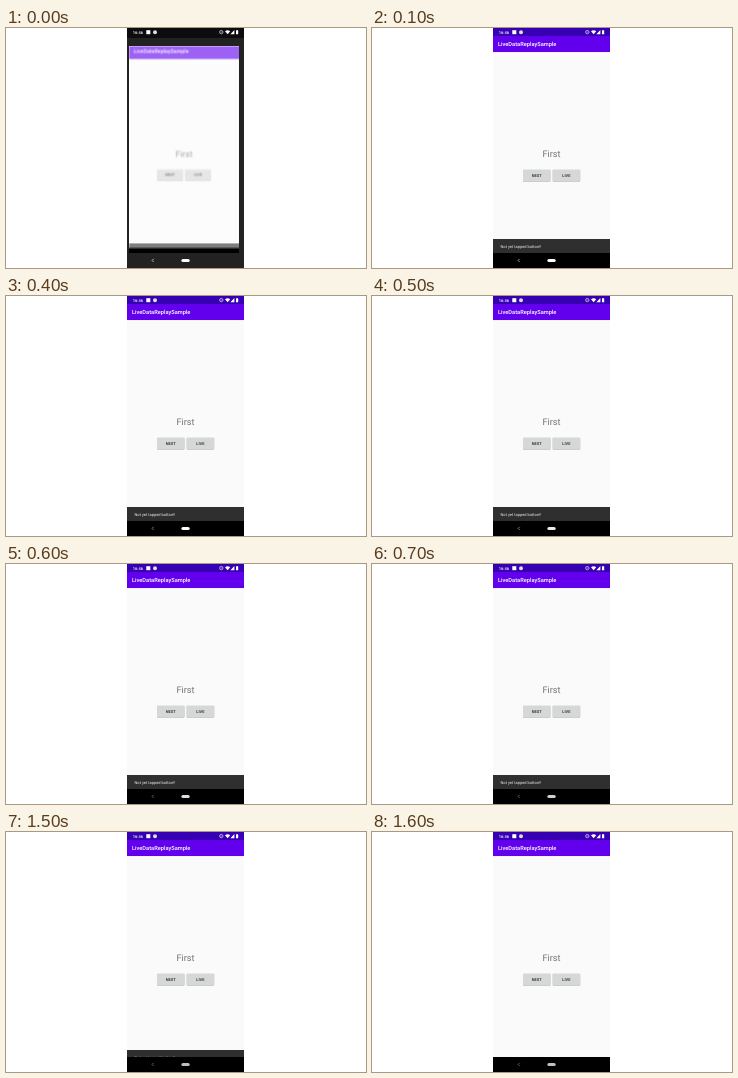
These frames come from a looping animation (360x240 px, 1700 ms). An HTML page:

```html
<!DOCTYPE html>
<html lang="en">
<head>
<meta charset="utf-8">
<title>LiveDataReplaySample</title>
<style>
  html, body { margin: 0; width: 100%; height: 100%; overflow: hidden; background: #fff; }
  svg { display: block; width: 100vw; height: 100vh; }
  text { font-family: Roboto, sans-serif; text-rendering: geometricPrecision; }
  .medium { font-weight: 500; }
  .label { font-size: 4px; }
  .middle { text-anchor: middle; }

  .window, .cut, .fade, .snackbar, .message, .pill, .back {
    animation: 1700ms step-end infinite;
  }
  .window { animation-name: open; }
  .cut { animation-name: cut; }
  .fade { animation-name: appear; }
  .snackbar { animation-name: slide; }
  .message { animation-name: message; }
  .pill { animation-name: pill; }
  .back { animation-name: back; }

  @keyframes open {
    0% { transform: translate(9.26px, 8.4px) scale(.94); }
    5.882%, 100% { transform: none; }
  }
  /* The opening window is cropped at its top and bottom. */
  @keyframes cut {
    0% { clip-path: inset(10px 0 9px 0); }
    5.882%, 100% { clip-path: inset(0); }
  }
  @keyframes appear {
    0% { opacity: .62; }
    5.882%, 100% { opacity: 1; }
  }
  @keyframes slide {
    0% { transform: translateY(8.8px); }
    5.882% { transform: none; }
    88.235% { transform: translateY(7px); }
    94.118%, 100% { transform: translateY(15px); }
  }
  @keyframes message {
    0% { opacity: 0; }
    5.882% { opacity: 1; }
    88.235% { opacity: .6; }
    94.118%, 100% { opacity: 0; }
  }
  @keyframes pill {
    0% { fill: #fff; }
    29.412% { fill: #ececec; }
    35.294% { fill: #dedede; }
    41.176% { fill: #d2d2d2; }
    47.059% { fill: #c8c8c8; }
    52.941%, 100% { fill: #c0c0c0; }
  }
  @keyframes back {
    0% { stroke: #ddd; }
    5.882% { stroke: #bbb; }
    23.529% { stroke: #999; }
    35.294%, 100% { stroke: #777; }
  }
</style>
</head>
<body>
<svg viewBox="0 0 360 240">
  <defs>
    <clipPath id="screen"><rect x="121" width="117" height="240"/></clipPath>
    <clipPath id="content"><rect x="121" y="24" width="117" height="201"/></clipPath>
  </defs>
  <rect width="360" height="240" fill="#fff"/>

  <g clip-path="url(#screen)">
    <rect x="121" width="117" height="240" fill="#222"/>
    <rect x="121" width="117" height="10" fill="#0c0c0e"/>

    <svg class="cut" width="360" height="240">
      <g class="window">
        <rect x="121" width="117" height="240" fill="#fff"/>
        <g class="fade">
          <rect x="121" y="8" width="117" height="16.2" fill="#6200ee"/>
          <text class="medium" x="126" y="18.1" font-size="5.7" fill="#fff">LiveDataReplaySample</text>
          <rect x="121" y="24.2" width="117" height="201" fill="#fafafa"/>
          <text class="middle" x="179.5" y="128.5" font-size="9.1" fill="#737373">First</text>

          <g fill="#bbb">
            <rect x="151" y="142" width="27.5" height="11.7" rx=".7"/>
            <rect x="180.7" y="142" width="27.5" height="11.7" rx=".7"/>
          </g>
          <g fill="#d6d7d7">
            <rect x="151" y="141.5" width="27.5" height="11.7" rx=".7"/>
            <rect x="180.7" y="141.5" width="27.5" height="11.7" rx=".7"/>
          </g>
          <g class="medium label middle" fill="#222">
            <text x="164.7" y="148.9">NEXT</text>
            <text x="194.4" y="148.9">LIVE</text>
          </g>

          <g clip-path="url(#content)">
            <g class="snackbar">
              <rect x="121" y="211" width="117" height="14.5" fill="#2f2f2f"/>
              <text class="label message" x="128.5" y="219.8" fill="#eee">Not yet tapped button!!</text>
            </g>
          </g>
        </g>
        <rect x="121" width="117" height="8" fill="#3700b3"/>
        <rect x="121" y="225" width="117" height="15" fill="#000"/>
      </g>
    </svg>

    <!-- System status and navigation -->
    <g fill="#fff">
      <text class="medium label" x="126.8" y="5.6">16:46</text>
      <rect x="140.3" y="2.2" width="4" height="4"/>
      <circle cx="149" cy="4.2" r="2" fill="#ddd"/>
      <circle cx="215.3" cy="4.1" r="1.7" fill="none" stroke="#ddd" stroke-width=".7"/>
      <path d="M214.4 4.1h1.8" stroke="#ddd" stroke-width=".5"/>
      <path d="M219 3.2q2.6-2 5.2 0l-2.6 3z"/>
      <path d="M228.4 2v4.2h-4z"/>
      <path d="M230 2.5h.6V2h1v.5h.6v3.7H230z"/>
    </g>
    <path class="back" d="M147.7 230.8l-1.6 1.6 1.6 1.6" fill="none" stroke-width=".8"/>
    <rect class="pill" x="175.4" y="231" width="8.3" height="3" rx="1.5"/>
  </g>
</svg>
</body>
</html>
```
